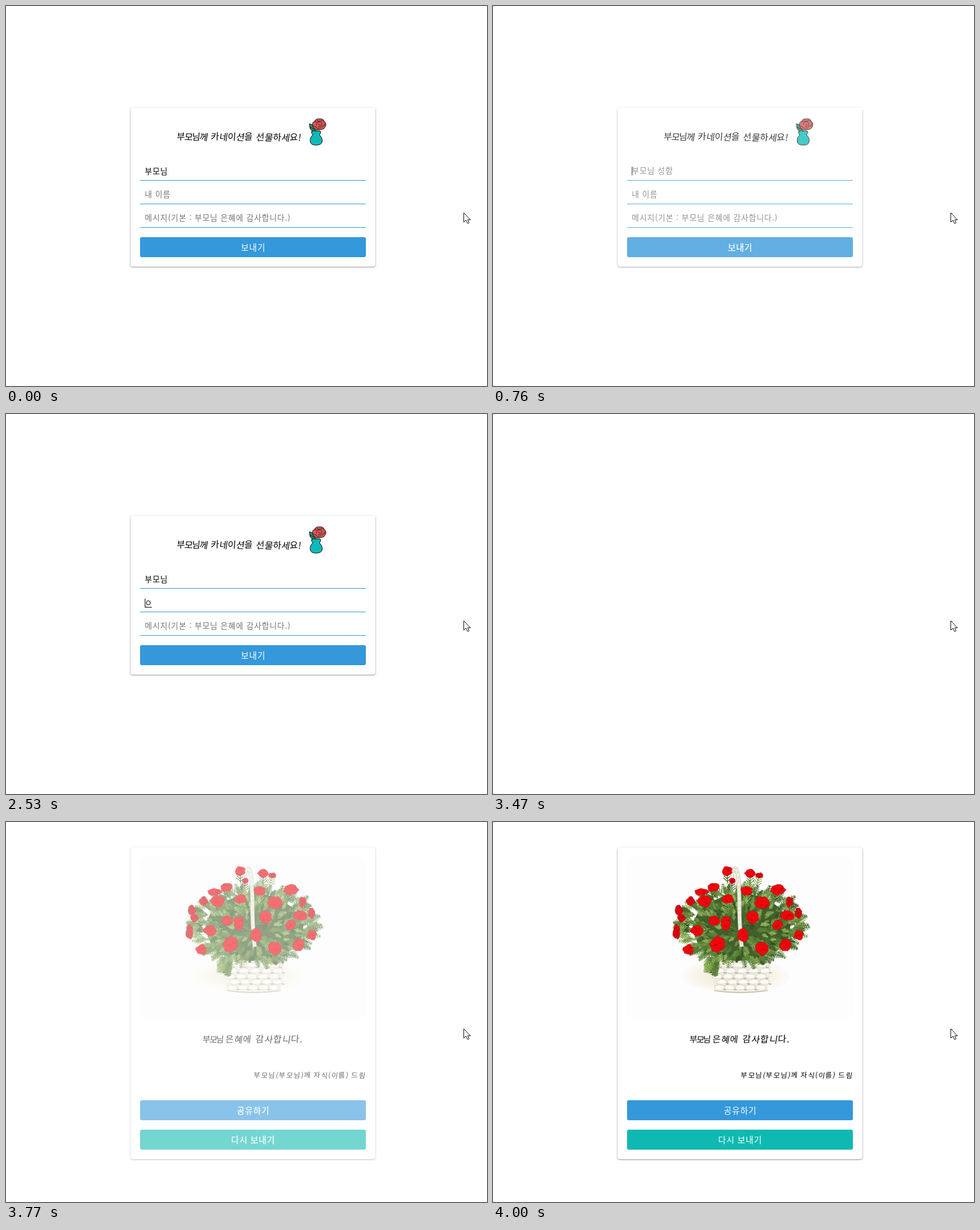
These frames come from a looping animation (818x646 px, 4.78 s). An HTML page:

```html
<!DOCTYPE html>
<html lang="ko">
<head>
<meta charset="utf-8">
<title>카네이션 선물하기</title>
<style>
  html, body { margin: 0; width: 100%; height: 100%; overflow: hidden; background: #fff; }
  svg { display: block; width: 100%; height: 100%; }
  text { font-family: "Noto Sans CJK KR", "Noto Sans CJK", "Noto Sans", sans-serif; white-space: pre; }
  .card { fill: #fff; filter: drop-shadow(0 1px 1.5px rgba(0, 0, 0, .42)); }
  .field { font-size: 13.33px; letter-spacing: .87px; font-weight: 300; }
  .label { font-size: 14.3px; letter-spacing: .85px; fill: #fff; stroke: #fff; text-anchor: middle; }
  .line { stroke: #17110f; stroke-width: 1; stroke-linejoin: round; stroke-linecap: round; }
  .pen { font-weight: 300; }
</style>
</head>
<body>
<svg viewBox="0 0 818 646">
  <g id="form">
    <rect class="card" x="212" y="173" width="416" height="270" rx="4"/>
    <g id="title"></g>
    <g id="vase" class="line">
      <path d="M526 213Q519 213 517 208L516 200Q521 201 525 205ZM517 206L525 210M527 213L530 208" fill="#2a8a70"/>
      <path d="M522 205Q519 198 525 196Q527 191 533 192Q540 191 541 196Q546 200 543 205Q541 210 535 210Q526 213 522 205Z" fill="#d85a58"/>
      <path d="M525 197Q529 194 533 196Q538 193 541 197M528 202Q527 197 532 197Q537 196 537 201Q536 206 531 205M523 204Q527 204 529 208Q535 209 538 204Q543 205 542 200M531 201L534 202" fill="none" stroke-width=".8"/>
      <path d="M520 213Q519 218 522 219Q516 224 517.5 231Q518.5 236.5 527.5 236.5Q537 236.5 537.8 230Q538 223 533 219Q535.5 217 535 213Q532 211 528 213Q524 211 520 213Z" fill="#0fb9b9"/>
    </g>
    <g id="fields"></g>
    <rect id="under" height="1" fill="#000"/>
    <rect id="caret" width="1" height="15" fill="#000"/>
  </g>
  <g id="result">
    <rect class="card" x="212" y="43" width="416" height="530" rx="4"/>
    <rect x="228" y="59" width="384" height="276" rx="10" fill="#fdfdfd"/>
    <g id="basket"></g>
    <g id="letter"></g>
  </g>
  <path d="M778.5 351.5V367.5L782.2 364L785 369.8L787.6 368.6L785 363.5H789.8Z" fill="#fff" stroke="#10101c"/>
</svg>
<script>
const LOOP = 4780, SUBMIT = 3470, TICK = 75;
const BLUE = '#3498db', TEAL = '#0fb9b1';
const $ = id => document.getElementById(id);

function add(parent, tag, attrs, text) {
  const el = document.createElementNS('http://www.w3.org/2000/svg', tag);
  for (const k in attrs) el.setAttribute(k, attrs[k]);
  if (text) el.textContent = text;
  parent.appendChild(el);
  return el;
}

let seed = 11;
function rand(a = 0, b = 1) {
  seed = (seed * 16807) % 2147483647;
  return a + (b - a) * seed / 2147483647;
}

function button(parent, y, fill, label) {
  add(parent, 'rect', { x: 228, y, width: 384, height: 34, rx: 3, fill });
  add(parent, 'text', { class: 'label', x: 420.4, y: y + 23 }, label);
}

// Slanted words with slightly tilted letters, as in pen writing.
function pen(parent, x, y, size, spacing, word) {
  const tilt = [...word].map((c, i) => [-4, 3, -1, 4][i % 4]).join(' ');
  add(parent, 'text', {
    class: 'pen', transform: `translate(${x} ${y}) skewX(-6)`, rotate: tilt,
    'font-size': size, 'letter-spacing': spacing
  }, word);
}

function field(y, hint) {
  const g = $('fields');
  add(g, 'rect', { x: 228, y: y + 16, width: 384, height: 1, fill: BLUE });
  return {
    y,
    hint: add(g, 'text', { class: 'field', x: 236, y: y + 5, fill: '#757575' }, hint),
    value: add(g, 'text', { class: 'field', x: 236, y: y + 6, fill: '#000' })
  };
}

const fields = [
  field(280, '부모님 성함'),
  field(320, '내 이름'),
  field(360, '메시지(기본 : 부모님 은혜에 감사합니다.)')
];
button($('form'), 393, BLUE, '보내기');
pen($('title'), 290, 228, 15.5, -1.4, '부모님께');
pen($('title'), 348, 228, 15.5, 0, '카네이션을');
pen($('title'), 425, 229, 15.5, 0, '선물하세요!');

pen($('letter'), 334, 375, 14.5, -2, '부모님');
pen($('letter'), 373, 375, 15, .9, '은혜에');
pen($('letter'), 424, 375, 15.5, .8, '감사합니다.');
pen($('letter'), 421, 435, 12, 1.4, '부모님(부모님)께');
pen($('letter'), 523, 435, 12, 1.2, '자식(이름)');
pen($('letter'), 587, 435, 12, 1.4, '드림');
button($('letter'), 473, BLUE, '공유하기');
button($('letter'), 523, TEAL, '다시 보내기');

function drawBasket(g) {
  for (let i = 0; i < 5; i++)
    add(g, 'ellipse', { cx: 412, cy: 262, rx: 92 - i * 10, ry: 28 - i * 3, fill: '#d8cba0', opacity: .07 });
  add(g, 'path', { d: 'M366 232L474 232Q470 262 466 287Q422 292 377 287Q374 260 366 232Z', fill: '#eeece2' });
  for (let row = 0; row < 5; row++) {
    const y = 240 + row * 9.5, inset = row * 2;
    for (let col = 0; col < 5; col++) {
      const x = 369 + inset + col * (20 - row * .6) + (row % 2) * 6;
      add(g, 'path', { d: `M${x} ${y + 1}q8 -4 16 0v5q-8 3 -16 0z`, fill: '#fbfaf3', stroke: '#d0ccbc', 'stroke-width': .8 });
      add(g, 'path', { d: `M${x + 15} ${y + 7}h5`, stroke: '#9a927c', 'stroke-width': 1.2 });
    }
  }
  add(g, 'path', { d: 'M376 286Q420 293 467 286', fill: 'none', stroke: '#c5c0ac', 'stroke-width': 2.5 });
  add(g, 'path', { d: 'M376 285Q420 291 467 285', fill: 'none', stroke: '#faf9f1', 'stroke-width': 1.4 });
}

function sprig(x, y, angle, len) {
  const dx = Math.cos(angle), dy = Math.sin(angle), f = v => v.toFixed(1);
  let d = `M${f(x)} ${f(y)}l${f(dx * len)} ${f(dy * len)}`;
  for (let s = .15; s < 1; s += .17)
    for (const side of [-.8, .8]) {
      const a = angle + side, l = len * (.42 - .3 * s);
      d += `M${f(x + dx * len * s)} ${f(y + dy * len * s)}l${f(Math.cos(a) * l)} ${f(Math.sin(a) * l)}`;
    }
  return d;
}

// A spray of fern that leans outwards from the heart of the basket.
function fern(r, len) {
  const a = rand(0, Math.PI * 2);
  const x = 421 + Math.cos(a) * r * 99, y = 176 + Math.sin(a) * r * 58;
  return sprig(x, y, Math.atan2(y - 192, x - 421) + rand(-.5, .5), len);
}

function drawLeaves(g) {
  add(g, 'path', {
    d: 'M340 172Q350 142 384 130Q420 112 462 130Q496 146 506 174Q504 206 478 222Q448 234 420 236Q384 236 358 218Q340 200 340 172Z',
    fill: '#425f2c'
  });
  const greens = ['#3a5a26', '#587f37', '#7a9f4d', '#33501f', '#6d9443', '#466e2c', '#90b35c', '#5b8238'];
  greens.forEach((stroke, layer) => {
    let d = '';
    for (let i = 0; i < 44; i++) d += fern(Math.sqrt(rand(.03, .85)), rand(10, 18));
    for (let i = 0; i < 16; i++) d += fern(rand(.86, 1), rand(14, 23));
    for (let i = 0; i < 3; i++) d += sprig(rand(362, 382), rand(226, 246), rand(1.2, 2), 20);
    for (let i = layer; i < blooms.length; i += 4) {
      const [x, y] = blooms[i], a = Math.atan2(y - 192, x - 421) + rand(-.3, .3);
      d += sprig(x - Math.cos(a) * 22, y - Math.sin(a) * 22, a, 26);
    }
    add(g, 'path', { d, stroke, fill: 'none', 'stroke-width': 1.15 });
  });
}

function drawHandle(g) {
  const d = 'M405 103Q406 79 412 79Q419 81 419 150Q420 190 423 212';
  add(g, 'path', { d, fill: 'none', stroke: '#c7c3ae', 'stroke-width': 7 });
  add(g, 'path', { d, fill: 'none', stroke: '#f4f2e6', 'stroke-width': 5 });
  add(g, 'path', { d, fill: 'none', stroke: '#cfcab6', 'stroke-width': 1, 'stroke-dasharray': '5 3' });
}

// x, y, half width, half height
const blooms = `398 83 9 8,437 87 9 7,453 91 7 5,407 100 5 5,375 111 11 7,354 119 12 6,
431 117 10 8,484 115 13 9,336 135 7 8,360 135 12 10,399 131 10 8,458 137 13 11,504 136 6 9,
316 150 7 9,321 163 7 7,441 161 11 11,501 159 12 9,519 155 6 9,376 168 10 9,396 172 9 13,
484 175 9 8,312 187 6 13,347 184 11 9,425 193 10 12,520 192 8 9,382 208 13 14,457 215 11 12,
497 209 10 11,332 217 9 9`.split(',').map(s => s.trim().split(' ').map(Number));

function drawBloom(g, [x, y, w, h]) {
  const pts = [], n = 16;
  for (let i = 0; i < n; i++) {
    const a = i / n * Math.PI * 2, r = rand(.82, 1.12);
    pts.push(`${(x + Math.cos(a) * w * r).toFixed(1)},${(y + Math.sin(a) * h * r).toFixed(1)}`);
  }
  add(g, 'polygon', { points: pts.join(' '), fill: w < 8 ? '#d20a10' : '#ec080d', stroke: '#b50a10', 'stroke-width': .6 });
  let d = '';
  for (let i = 0; i < 5; i++) {
    const px = x + rand(-.6, .4) * w, py = y + rand(-.6, .6) * h;
    d += `M${px} ${py}q${w * .2} ${rand(-3, 3)} ${w * .4} ${rand(-2, 2)}`;
  }
  add(g, 'path', { d, fill: 'none', stroke: '#b80008', 'stroke-width': .8 });
}

const basket = $('basket');
drawBasket(basket);
drawLeaves(basket);
drawHandle(basket);
blooms.forEach(b => drawBloom(basket, b));

const typing = [
  [[1530, 'ㅂ'], [1610, '부'], [1760, '붐'], [1840, '부모'], [1990, '부몬'], [2070, '부모니'], [2150, '부모님']],
  [[2530, 'ㅇ'], [2610, '이'], [2760, '일'], [2840, '이르'], [2920, '이름']]
];
const typed = (keys, t) => keys.reduce((s, [at, text]) => t >= at ? text : s, '');
const clamp = v => Math.max(0, Math.min(1, v));
const fade = (t, from, base) => clamp(base + .152 * Math.floor((t - from) / TICK));
const show = (el, on) => el.setAttribute('visibility', on ? 'inherit' : 'hidden');

function setOpacity(id, value) {
  const g = $(id);
  g.setAttribute('opacity', value);
  g.querySelectorAll('.label').forEach(l => l.setAttribute('stroke-width', value < 1 ? .25 : 0));
}

function render(t) {
  const intro = t < 460, sent = t >= SUBMIT;
  setOpacity('form', intro ? 1 : sent ? 0 : fade(t, 460, .16));
  setOpacity('result', sent ? fade(t, SUBMIT, -.03) : 0);

  const values = [intro ? '부모님' : typed(typing[0], t), typed(typing[1], t), ''];
  fields.forEach((f, i) => {
    f.value.textContent = values[i];
    show(f.hint, !values[i]);
  });

  const active = t < 2300 ? 0 : 1, length = values[active].length;
  const x = Math.round(236 + Math.max(0, length - 1) * 13.13), y = fields[active].y;
  const caret = $('caret'), under = $('under');
  caret.setAttribute('x', x);
  caret.setAttribute('y', y - 7 + (length ? 1 : 0));
  show(caret, !intro && !(t >= 980 && t < 1460));
  under.setAttribute('x', x);
  under.setAttribute('y', y + 8);
  under.setAttribute('width', 12);
  show(under, !intro && length > 0);
}

let start = null;
function tick(now) {
  if (start === null) start = now;
  render((now - start) % LOOP);
  requestAnimationFrame(tick);
}
render(0);
requestAnimationFrame(tick);
</script>
</body>
</html>
```
